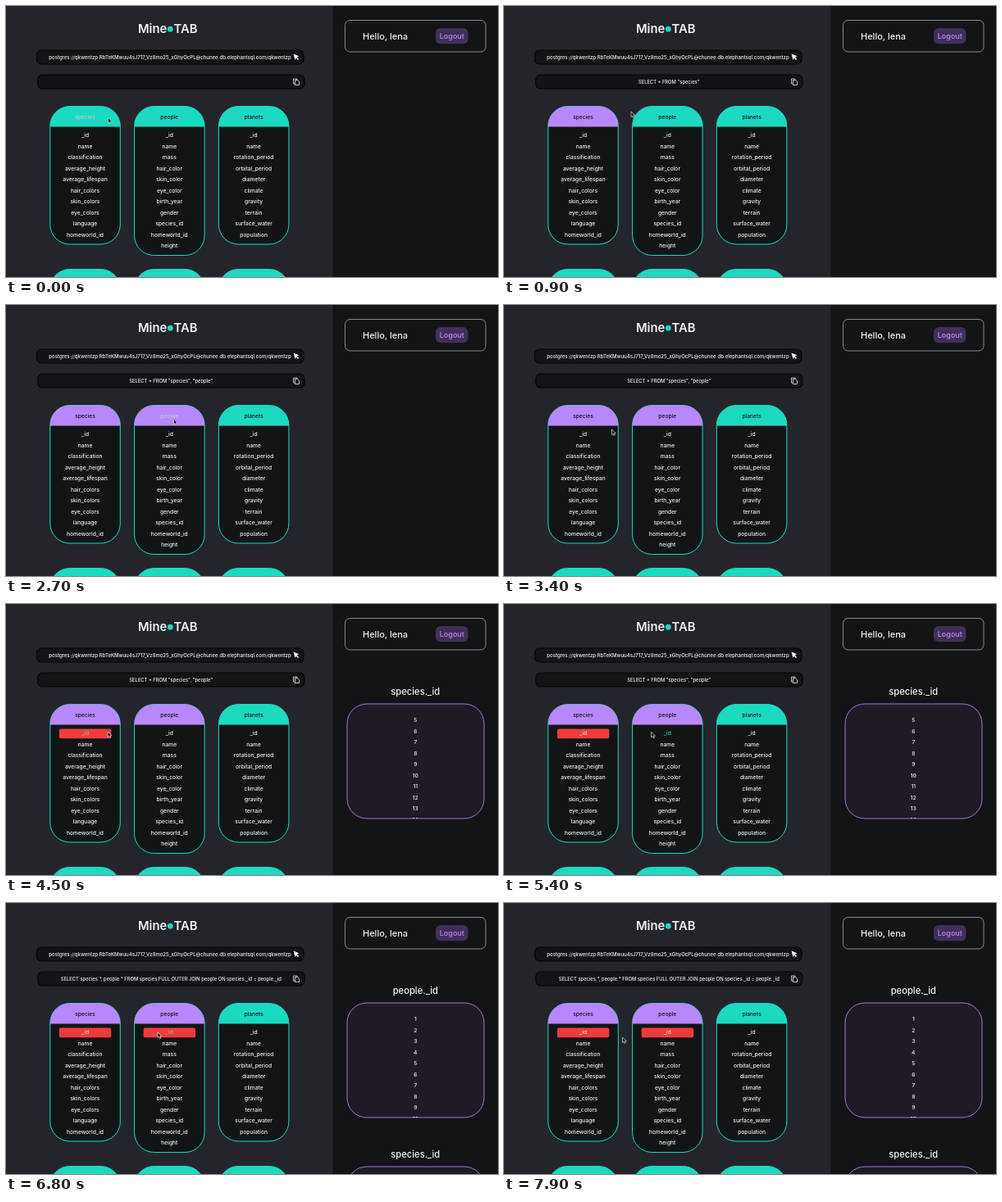
An HTML page that plays this animation: 600x331 px, repeating every 8000 ms.

```html
<!DOCTYPE html>
<html lang="en">
<head>
<meta charset="utf-8">
<title>Query builder</title>
<style>
  html, body { margin: 0; width: 100%; height: 100%; overflow: hidden; background: #131416; }
  svg { display: block; width: 100%; height: 100%; }
  text { font-family: Inter, Roboto, sans-serif; font-size: 6.7px; font-weight: 500; fill: #f1f1f3; text-anchor: middle; }
  .logo { font-size: 14.8px; font-weight: 600; }
  .input { font-size: 5.8px; }
  .title { font-size: 11.2px; }
  .bar { fill: #131416; stroke: #050506; stroke-width: 1.2; }
  .card { fill: #131416; stroke: #1bdac0; }
  .head { fill: #1bdac0; }
  .picked .head { fill: #b788fb; }
  .name { fill: #131416; }
  .name.hover { fill: #c3c4c8; }
  .mark { fill: #ee3c3c; visibility: hidden; }
  .chosen .mark { visibility: visible; }
  .chosen text { fill: #f8d6d6; }
  .row.hover text { fill: #1bdac0; }
  .row.chosen.hover text { fill: #b5a49b; }
  .box { fill: #201a25; stroke: #a172d6; }
</style>
</head>
<body>
<svg id="stage" viewBox="0 0 600 331">
  <defs>
    <clipPath id="inside"><rect x="416" y="122" width="167" height="140" rx="24"/></clipPath>
  </defs>
  <rect width="600" height="331" fill="#131416"/>
  <rect width="398.5" height="331" fill="#24252b"/>

  <text class="logo" x="196.3" y="33.3" style="text-anchor:end">Mine</text>
  <circle cx="200.3" cy="28.2" r="3.4" fill="#1bdac0"/>
  <text class="logo" x="204.5" y="33.3" style="text-anchor:start">TAB</text>

  <rect class="bar" x="37.5" y="54" width="325.5" height="17" rx="6"/>
  <text class="input" x="200" y="64.6" style="font-size:6px">postgres://qkwentzp:RbTeKMwuu4sJ717_Vz8mo25_xGhyOcPL@chunee.db.elephantsql.com/qkwentzp</text>
  <path d="M350.5 58.5l6.8 2.8-2.5 1.2 2.3 2.4-1 1-2.4-2.4-1.1 2.4z" fill="#fff"/>

  <rect class="bar" x="38.8" y="84" width="325.2" height="17" rx="6"/>
  <text class="input" id="query" x="201.3" y="94.6"></text>
  <g fill="none" stroke="#d6d6d9" stroke-width=".9">
    <path d="M352 95h-1.5v-6h4.5v1"/>
    <path d="M352.5 90.5h3l2 2v4h-5z"/>
  </g>

  <g id="cards"></g>

  <rect x="413.5" y="17.5" width="171.5" height="38.5" rx="6" fill="none" stroke="#a4a4a8" stroke-width=".8"/>
  <text x="462.5" y="40.8" style="font-size:11px">Hello, lena</text>
  <rect x="524" y="27" width="39.5" height="19.3" rx="6" fill="#412f58"/>
  <text x="543.8" y="39.8" style="font-size:9px;fill:#b788fb">Logout</text>

  <g id="panels"></g>
  <path id="cursor" d="M0 0v6.6l1.6-1.4 1 2.3 1.2-.5-1-2.3h2.1z" fill="#0c0c0e" stroke="#e2e2e4" stroke-width=".7"/>
</svg>
<script>
const LOOP = 8000, STEP = 100;
const $ = id => document.getElementById(id);

function add(parent, tag, attrs, text) {
  const el = document.createElementNS("http://www.w3.org/2000/svg", tag);
  for (const key in attrs) el.setAttribute(key, attrs[key]);
  if (text !== undefined) el.textContent = text;
  parent.append(el);
  return el;
}

const tables = {
  species: "_id name classification average_height average_lifespan hair_colors skin_colors eye_colors language homeworld_id",
  people: "_id name mass hair_color skin_color eye_color birth_year gender species_id homeworld_id height",
  planets: "_id name rotation_period orbital_period diameter climate gravity terrain surface_water population"
};
const targets = [];

function addTarget(el, x, y, w, h) {
  targets.push({ el, hit: (px, py) => px >= x && px <= x + w && py >= y && py <= y + h });
}

function addCard(x, y, height) {
  const g = add($("cards"), "g", {});
  add(g, "path", { class: "head", d: `M${x} ${y + 25}v-1a24 24 0 0 1 24-24h37.5a24 24 0 0 1 24 24v1z` });
  g.prepend(add(g, "rect", { class: "card", x, y, width: 85.5, height, rx: 24 }));
  return g;
}

function addTable(name, i) {
  const x = 53.8 + i * 102.8, mid = x + 42.7;
  const fields = tables[name].split(" ");
  const card = addCard(x, 122.5, 33.5 + fields.length * 13.5);
  const label = add(card, "text", { class: "name", x: mid, y: 137.6 }, name);
  addTarget(label, x, 122.5, 85.5, 25);
  const rows = fields.map((field, n) => {
    const y = 158.3 + n * 13.5;
    const row = add(card, "g", { class: "row" });
    add(row, "rect", { class: "mark", x: mid - 31.6, y: y - 5.8, width: 63.4, height: 11.8, rx: 1.8 });
    add(row, "text", { x: mid, y: y + 2.1 }, field);
    addTarget(row, mid - 31.8, y - 5.8, 63.6, 11.6);
    return row;
  });
  addCard(x, 321.5, 168);
  return { card, id: rows[0] };
}

function addPanel(title, first) {
  const g = add($("panels"), "g", {});
  add(g, "text", { class: "title", x: 499.3, y: 110.8 }, title);
  add(g, "rect", { class: "box", x: 416, y: 122, width: 167, height: 140, rx: 24 });
  const list = add(g, "g", { "clip-path": "url(#inside)" });
  for (let n = 0; n < 10; n++) add(list, "text", { x: 499.3, y: 144.4 + n * 13.5 }, first + n);
  return g;
}

const [species, people] = Object.keys(tables).map(addTable);
const speciesPanel = addPanel("species._id", 5);
const peoplePanel = addPanel("people._id", 1);

// time, x, y of the pointer tip
const path = [
  [0, 124.5, 136.5], [400, 124.5, 136.5], [800, 155, 129], [1300, 155, 129],
  [1700, 222.5, 136], [2500, 222.5, 136], [3200, 131.5, 152], [3500, 131.5, 152],
  [3800, 124, 156], [4800, 124, 156], [5300, 178.5, 156], [5700, 185, 158],
  [7000, 185, 158], [7600, 144.5, 164], [LOOP, 144.5, 164]
];

function pointerAt(t) {
  const i = path.findIndex(p => p[0] > t);
  const [t0, x0, y0] = path[i - 1], [t1, x1, y1] = path[i];
  const k = (t - t0) / (t1 - t0), e = k * k * (3 - 2 * k);
  return [x0 + (x1 - x0) * e, y0 + (y1 - y0) * e];
}

const queries = [
  [5800, "SELECT species.*, people.* FROM species FULL OUTER JOIN people ON species._id = people._id"],
  [2300, 'SELECT * FROM "species", "people"'],
  [300, 'SELECT * FROM "species"'],
  [0, ""]
];
const show = (el, on) => el.setAttribute("visibility", on ? "visible" : "hidden");

function draw(t) {
  const [x, y] = pointerAt(t), joined = t >= 5800;
  $("cursor").setAttribute("transform", `translate(${x} ${y})`);
  for (const { el, hit } of targets) el.classList.toggle("hover", hit(x, y));
  $("query").textContent = queries.find(q => t >= q[0])[1];
  species.card.classList.toggle("picked", t >= 300);
  people.card.classList.toggle("picked", t >= 2300);
  species.id.classList.toggle("chosen", t >= 4400);
  people.id.classList.toggle("chosen", joined);
  show(speciesPanel, t >= 4400);
  show(peoplePanel, joined);
  speciesPanel.setAttribute("transform", `translate(0 ${joined ? 200 : 0})`);
}

const start = performance.now();
function tick() {
  const t = (performance.now() - start) % LOOP;
  draw(Math.floor(t / STEP) * STEP);
  requestAnimationFrame(tick);
}
tick();
</script>
</body>
</html>
```
